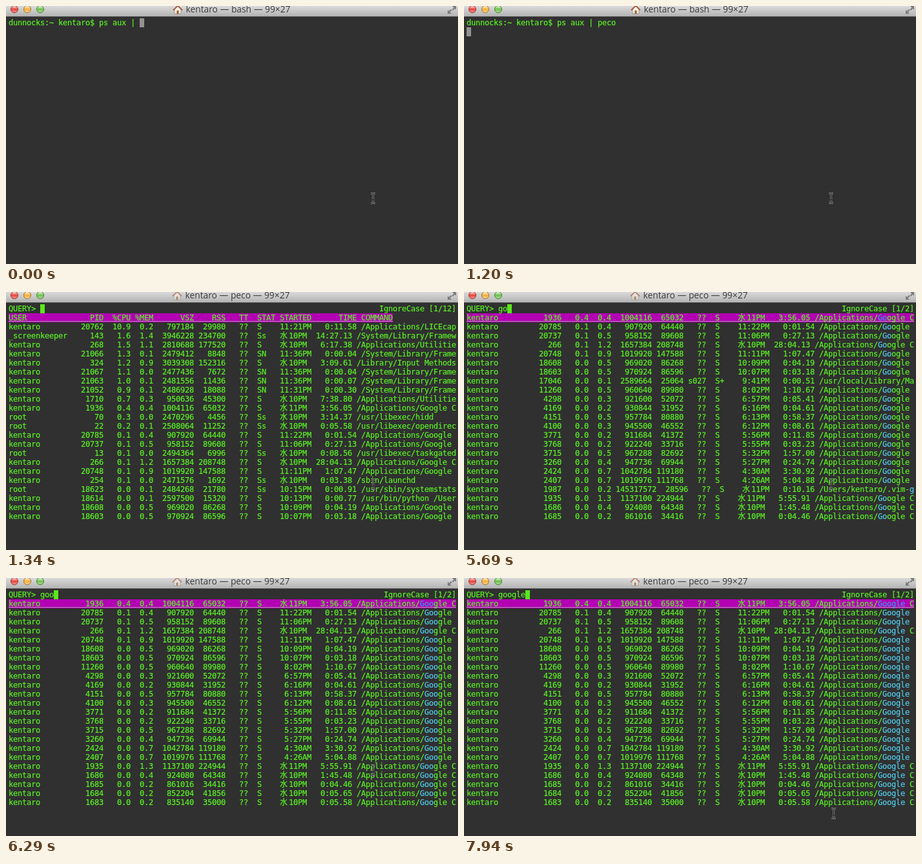
Animation, 700 px wide and 400 px high, one loop 8 s. Source, as an HTML page:

```html
<!DOCTYPE html>
<html lang="en">
<head>
<meta charset="utf-8">
<title>Interactive process filter</title>
<style>
  html, body { margin: 0; width: 100%; height: 100%; overflow: hidden; background: #303030; }
  #stage { position: relative; width: 700px; height: 400px; overflow: hidden; background: #303030; }
  #bar {
    position: absolute; inset: 0 0 auto; height: 16px; border-bottom: 1px solid #505050;
    background: linear-gradient(#dadada, #b3b3b3);
  }
  #bar svg { position: absolute; left: 0; top: 0; }
  #title {
    position: absolute; left: 209px; top: -5px; width: 301px; text-align: center; white-space: pre;
    font: 13.8px/20px "Open Sans", "Noto Sans", sans-serif; color: #3a3a3a;
  }
  .peco #title { left: 208px; }
  .peco #home { opacity: .6; transform: translateX(-1px); }
  #screen {
    position: absolute; left: 4px; top: 19px; width: 693px; height: 378px; overflow: hidden;
    font: 12px/14px "DejaVu Sans Mono", "Noto Sans CJK JP", monospace;
    letter-spacing: calc(7px - 1ch); white-space: pre; color: #5bf225;
    -webkit-text-stroke: .2px;
  }
  .row { position: relative; height: 14px; }
  .row i { display: inline-block; width: 14px; height: 14px; font-style: normal; vertical-align: top; }
  .row mark { background: none; color: #50cbe8; }
  .cursor { display: inline-block; width: 7px; height: 14px; vertical-align: top; background: #929292; }
  .peco .cursor { background: #5be61d; }
  .status { position: absolute; right: 0; top: 0; }
  .selected {
    display: inline-block; height: 14px; vertical-align: top;
    background: linear-gradient(#b58fb5, #b58fb5) 0 12px / 100% 1px no-repeat #b200b2;
  }
  .selected mark { color: #3c96ee; }
  #pointer { position: absolute; left: 564px; top: 289px; }
</style>
</head>
<body>
<div id="stage">
  <div id="bar">
    <svg width="700" height="16">
      <defs>
        <linearGradient id="gloss" x2="0" y2="1">
          <stop offset=".1" stop-color="#fff" stop-opacity=".7"/>
          <stop offset=".5" stop-color="#fff" stop-opacity="0"/>
          <stop offset="1" stop-color="#fff" stop-opacity=".45"/>
        </linearGradient>
      </defs>
      <g stroke-width="1">
        <circle cx="13" cy="5" r="5.5" fill="#e8423a" stroke="#9c3a34"/>
        <circle cx="33" cy="5" r="5.5" fill="#f4ae38" stroke="#a0742c"/>
        <circle cx="53" cy="5" r="5.5" fill="#6cc04a" stroke="#4b8138"/>
      </g>
      <g fill="url(#gloss)">
        <circle cx="13" cy="5" r="5"/><circle cx="33" cy="5" r="5"/><circle cx="53" cy="5" r="5"/>
      </g>
      <g id="home">
        <path d="M261 5v7h10V5l-5-5z" fill="#f3eee4" stroke="#8d8478" stroke-width=".8"/>
        <path d="M259 6.5l7-7 7 7" fill="none" stroke="#a8543a" stroke-width="1.8"/>
        <path d="M264.5 7h3v5h-3z" fill="#96602f"/>
      </g>
      <path d="M691 0h6v6l-2-2-3 3-1.500-1.500 3-3zM690 12h-6V6l2 2 3-3 1.500 1.500-3 3z" fill="#7b7b7b"/>
    </svg>
    <div id="title"></div>
  </div>
  <div id="screen"></div>
  <svg id="pointer" width="9" height="18" fill="none">
    <defs>
      <path id="beam" d="M1 1.500h1.500q2 0 2 2v11q0 2-2 2H1M8 1.500H6.500q-2 0-2 2M8 16.500H6.500q-2 0-2-2M3 11.500h3"/>
    </defs>
    <use href="#beam" stroke="#9a9a9a" stroke-width="2.4"/>
    <use href="#beam" stroke="#141414"/>
  </svg>
</div>

<script>
const LOOP = 8000;
const TYPE_TIMES = [300, 450, 600, 750];
const ENTER = 1200, LAUNCH = 1340, POINTER_MOVE = 7940;
const QUERY_TIMES = [5540, 5690, 6290, 6590, 6890, 7040];
const VISIBLE_ROWS = 23;
const USER = "kentaro";

const COMMANDS = {
  GC: "/Applications/Google C", G: "/Applications/Google ", U: "/Applications/Utilitie",
  F: "/System/Library/Frame", P: "/usr/bin/python /User", L: "login -pf " + USER
};

// First field: how many query letters the full line still matches. "~" is the user.
const TABLE = `
0 USER PID %CPU %MEM VSZ RSS TT STAT STARTED TIME COMMAND
0 ~ 20762 10.9 0.2 797184 29980 ?? S 11:21PM 0:11.58 /Applications/LICEcap
1 _screenkeeper 143 1.6 1.4 3946228 234700 ?? Ss 水10PM 14:27.13 /System/Library/Framew
0 ~ 268 1.5 1.1 2810688 177520 ?? S 水10PM 6:17.38 U
0 ~ 21066 1.3 0.1 2479412 8848 ?? SN 11:36PM 0:00.04 F
0 ~ 324 1.2 0.9 3039308 152316 ?? S 水10PM 3:09.61 /Library/Input Methods
0 ~ 21067 1.1 0.0 2477436 7672 ?? SN 11:36PM 0:00.04 F
0 ~ 21063 1.0 0.1 2481556 11436 ?? SN 11:36PM 0:00.07 F
0 ~ 21052 0.9 0.1 2486928 18088 ?? SN 11:31PM 0:00.30 F
0 ~ 1710 0.7 0.3 950636 45300 ?? S 水10PM 7:38.80 U
6 ~ 1936 0.4 0.4 1004116 65032 ?? S 水11PM 3:56.05 GC
0 root 70 0.3 0.0 2470296 4456 ?? Ss 水10PM 3:14.37 /usr/libexec/hidd
0 root 22 0.2 0.1 2508064 11252 ?? Ss 水10PM 0:05.58 /usr/libexec/opendirec
6 ~ 20785 0.1 0.4 907920 64440 ?? S 11:22PM 0:01.54 G
6 ~ 20737 0.1 0.5 958152 89608 ?? S 11:06PM 0:27.13 G
1 root 13 0.1 0.0 2494364 6996 ?? Ss 水10PM 0:08.56 /usr/libexec/taskgated
6 ~ 266 0.1 1.2 1657384 208748 ?? S 水10PM 28:04.13 GC
6 ~ 20748 0.1 0.9 1019920 147588 ?? S 11:11PM 1:07.47 G
0 ~ 254 0.1 0.0 2471576 1692 ?? Ss 水10PM 0:03.38 /sbin/launchd
0 root 18623 0.0 0.1 2484268 21780 ?? Ss 10:15PM 0:00.91 /usr/sbin/systemstats
1 ~ 18614 0.0 0.1 2597500 15320 ?? S 10:13PM 0:00.77 P
6 ~ 18608 0.0 0.5 969020 86268 ?? S 10:09PM 0:04.19 G
6 ~ 18603 0.0 0.5 970924 86596 ?? S 10:07PM 0:03.18 G
1 ~ 17050 0.0 0.1 2598180 22888 s027 S+ 9:41PM 0:01.14 P
2 ~ 17046 0.0 0.1 2589664 25064 s027 S+ 9:41PM 0:00.51 /usr/local/Library/Ma
1 root 15243 0.0 0.0 2468920 2256 s027 Ss 9:39PM 0:00.03 L
1 root 15112 0.0 0.0 2468920 2220 s004 Ss 9:27PM 0:00.02 L
1 ~ 13857 0.0 0.0 2597500 3764 ?? S 8:36PM 0:01.55 P
6 ~ 11260 0.0 0.5 960640 89980 ?? S 8:02PM 1:10.67 G
6 ~ 4298 0.0 0.3 921600 52072 ?? S 6:57PM 0:05.41 G
6 ~ 4169 0.0 0.2 930844 31952 ?? S 6:16PM 0:04.61 G
6 ~ 4151 0.0 0.5 957784 80880 ?? S 6:13PM 0:58.37 G
6 ~ 4100 0.0 0.3 945500 46552 ?? S 6:12PM 0:08.61 G
1 ~ 3827 0.0 0.0 2598540 7708 s031 S+ 5:57PM 0:03.14 P
1 root 3772 0.0 0.0 2468920 1404 s031 Ss 5:57PM 0:00.02 L
6 ~ 3771 0.0 0.2 911684 41372 ?? S 5:56PM 0:11.85 G
6 ~ 3768 0.0 0.2 922240 33716 ?? S 5:55PM 0:03.23 G
6 ~ 3715 0.0 0.5 967288 82692 ?? S 5:32PM 1:57.00 G
6 ~ 3260 0.0 0.4 947736 69944 ?? S 5:27PM 0:24.74 G
6 ~ 2424 0.0 0.7 1042784 119180 ?? S 4:30AM 3:30.92 G
6 ~ 2407 0.0 0.7 1019976 111768 ?? S 4:26AM 5:04.88 G
2 ~ 1987 0.0 0.2 145317572 28596 ?? S 水11PM 0:10.16 /Users/${USER}/.vim-go
6 ~ 1935 0.0 1.3 1137100 224944 ?? S 水11PM 5:55.91 GC
6 ~ 1686 0.0 0.4 924080 64348 ?? S 水10PM 1:45.48 GC
6 ~ 1685 0.0 0.2 861016 34416 ?? S 水10PM 0:04.46 GC
6 ~ 1684 0.0 0.2 852204 41856 ?? S 水10PM 0:05.65 GC
6 ~ 1683 0.0 0.2 835140 35000 ?? S 水10PM 0:05.58 GC`;

function parse(line) {
  const [depth, user, pid, cpu, mem, vsz, rss, tt, stat, started, time, ...rest] = line.split(" ");
  const command = rest.join(" ");
  const text = (user === "~" ? USER : user).padEnd(13) + pid.padStart(8) + cpu.padStart(6) +
    mem.padStart(5) + " " + vsz.padStart(8) + rss.padStart(7) + tt.padStart(5) +
    "  " + stat.padEnd(4) + " " + (started[0] === "水" ? started : started.padStart(7)) +
    time.padStart(10) + " " + (COMMANDS[command] || command);
  return { depth: +depth, text };
}

const processes = TABLE.trim().split("\n").map(parse);
const stage = document.getElementById("stage");
const screen = document.getElementById("screen");
const title = document.getElementById("title");
const pointer = document.getElementById("pointer");
const cursor = '<b class="cursor"></b>';

const row = html => `<div class="row">${html}</div>`;
const passed = (times, t) => times.filter(time => t >= time).length;

function shellView(typed, entered) {
  const prompt = `dunnocks:~ ${USER}$ ps aux | ` + "peco".slice(0, typed);
  return entered ? row(prompt) + row(cursor) : row(prompt + cursor);
}

function pecoView(typed) {
  const query = "google".slice(0, typed);
  const pages = [12, 6, 2][Math.min(typed, 2)];
  const head = row(`QUERY&gt; ${query}${cursor}<span class="status">IgnoreCase [1/${pages}]</span>`);
  const list = processes.filter(p => p.depth >= typed).slice(0, VISIBLE_ROWS).map((p, i) => {
    let html = p.text;
    if (query) html = html.replace(new RegExp(query, "gi"), "<mark>$&</mark>");
    html = html.replace("水", "<i>水</i>");
    return row(i ? html : `<span class="selected">${html}</span>`);
  });
  return head + list.join("");
}

let shown = "";
function draw() {
  const t = performance.now() % LOOP;
  const peco = t >= LAUNCH;
  const entered = t >= ENTER;
  const typed = passed(peco ? QUERY_TIMES : TYPE_TIMES, t);
  const state = [peco, entered, typed].join();
  if (state !== shown) {
    shown = state;
    stage.className = peco ? "peco" : "";
    title.textContent = `${USER} — ${peco ? "peco" : "bash"} — 99×27`;
    screen.innerHTML = peco ? pecoView(typed) : shellView(typed, entered);
  }
  pointer.style.transform = t >= POINTER_MOVE ? "translate(4px, 67px)" : "none";
  requestAnimationFrame(draw);
}
draw();
</script>
</body>
</html>
```
